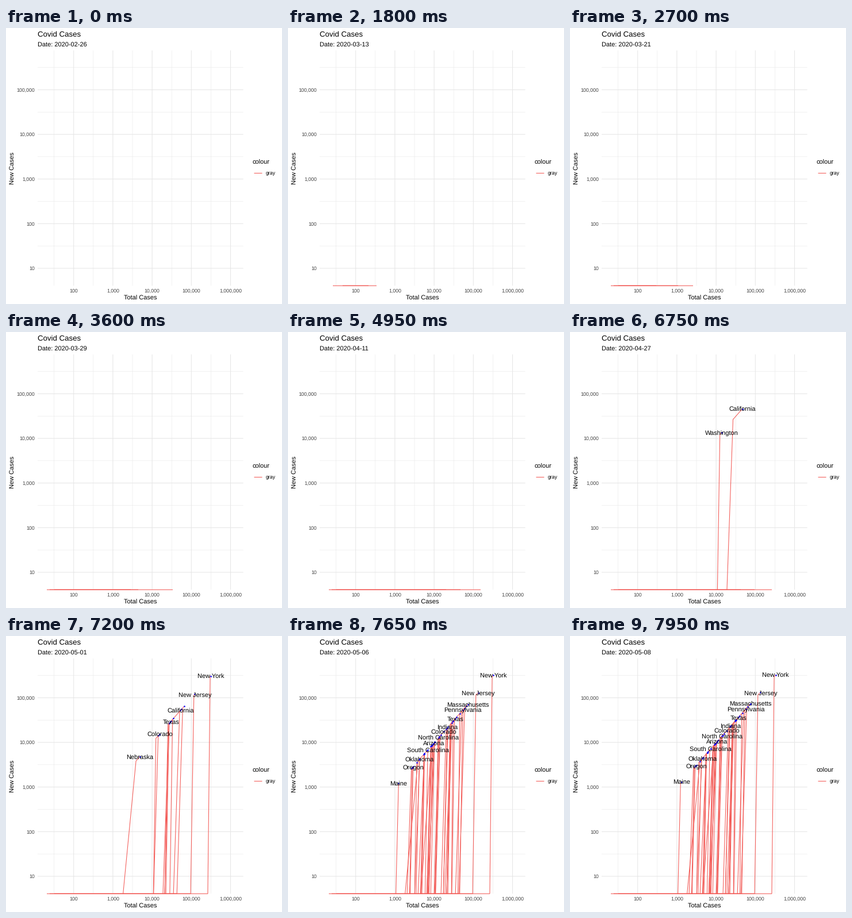
Write a matplotlib script that moves like this. It is 480 px wide and 480 px high and loops after 8 s.

```python
import numpy as np
import matplotlib.pyplot as plt
from matplotlib.animation import FuncAnimation
from matplotlib.collections import LineCollection
from matplotlib.patches import Rectangle

plt.rcParams.update({"font.family": "Liberation Sans", "text.hinting": "no_hinting"})

SIZE, DPI = 480, 72
LEFT, RIGHT, TOP, BOTTOM = 55, 412.6, 39, 448.2
TICK_MS, TICKS_PER_STEP, TICKS = 50, 3, 160
LINE_RED, GRID, TICK_TEXT = "#f35e5a", "#e6e6e6", "#444444"
ACTIVE_SHARE = 0.985
LABEL_HEIGHT = 8

# Weekly totals in thousands, all ending in the same week. The first value of
# each state still has no new cases. The order sets the label priority.
LAST_WEEK = 11
STATES = {
    "New York": (263, 302, 323.9, 340.7),
    "New Jersey": (95.9, 116.3, 131.9, 141),
    "Pennsylvania": (45.1, 54.2, 62),
    "California": (18.9, 27, 36.9, 48.9, 58.8, 73),
    "Massachusetts": (42.9, 60.3, 72, 80),
    "Texas": (21, 27.3, 34.5, 43),
    "Indiana": (17.2, 22.6, 26.5),
    "Colorado": (10.9, 14.3, 17.6, 20.3),
    "North Carolina": (10, 13, 16),
    "Arizona": (7.2, 9.7, 12.2),
    "South Carolina": (5.9, 6.9, 8),
    "Oklahoma": (3.47, 4.2, 4.85),
    "Oregon": (2.45, 2.92, 3.4),
    "Maine": (1.06, 1.24, 1.47),
    "Nebraska": (1.82, 3.88, 6.6, 8.7),
    "Washington": (10.8, 12.5, 14.1, 15.1, 16.8),
    "Illinois": (35, 50.4, 66, 84),
    "Florida": (28.3, 33.2, 37.4, 42.4),
    "Georgia": (21, 25.3, 30, 34.9),
    "Connecticut": (22.5, 26.8, 30.6, 34.9),
    "Michigan": (40.4, 45, 48.4),
    "Louisiana": (27.7, 30.4, 32.7),
    "Maryland": (20.9, 28.2, 34.8),
    "Ohio": (17.3, 21.6, 25.7),
    "Virginia": (15, 20.3, 26.7),
    "Tennessee": (10.4, 13.7, 16.4),
    "Iowa": (6.8, 10.4, 13),
    "Rhode Island": (8.2, 10.2, 11.8),
    "Minnesota": (4.6, 8.6, 13),
    "Missouri": (7.4, 9.3, 10.3),
    "Wisconsin": (6.5, 8.9, 10.9),
    "Alabama": (6.9, 8.4, 10.5),
    "Mississippi": (6.6, 8.2, 10.1),
    "Kansas": (3.9, 5.6, 7.4),
    "Delaware": (4.65, 5.5, 6.95),
    "Utah": (4.5, 5.6, 6.6),
    "Nevada": (4.9, 5.7, 6.4),
    "New Mexico": (3.2, 4.3, 5.4),
    "Arkansas": (3.2, 3.6, 4.2),
    "New Hampshire": (2.05, 2.64, 3.3),
    "South Dakota": (2.37, 2.78, 3.7),
}

# Lines along the panel floor: first week, early and late left end, and the
# right end for each week.
FLOOR_LINES = (
    (1, 78, 71, (110, 154, 214, 290, 317, 335, 345, 351)),
    (2, 95, 76, (140, 188, 230, 277, 300, 312, 321)),
    (3, 84, 84, (150, 217, 250, 275, 287, 297)),
)


def x_pos(log_total):
    return 117.7 + 68.2 * (log_total - 2)


def y_pos(log_new):
    return 417.9 - 77.62 * (log_new - 1)


fig = plt.figure(figsize=(SIZE / DPI, SIZE / DPI), dpi=DPI, facecolor="white")
ax = fig.add_axes([0, 0, 1, 1])
ax.set(xlim=(0, SIZE), ylim=(SIZE, 0))
ax.axis("off")


def write(x, y, text, size=11, color="black", **kw):
    return ax.text(x, y, text, fontsize=size, color=color, va="baseline", **kw)


def grid_line(xs, ys, width):
    ax.plot(xs, ys, color=GRID, lw=width, solid_capstyle="butt", snap=False,
            zorder=1)


for shift, width in ((-0.5, 0.53), (0, 1.07)):
    for power in range(2, 7):
        x = x_pos(power + shift)
        grid_line((x, x), (TOP, BOTTOM), width)
    for power in range(1, 6):
        y = y_pos(power - shift)
        grid_line((LEFT, RIGHT), (y, y), width)

for power in range(2, 7):
    write(x_pos(power), 460, f"{10 ** power:,}", 8.8, TICK_TEXT, ha="center")
for power in range(1, 6):
    write(50, y_pos(power) + 3.2, f"{10 ** power:,}", 8.8, TICK_TEXT, ha="right")

write(55, 15, "Covid Cases", 13.2)
subtitle = write(55, 32, "")
write(234, 473, "Total Cases", ha="center")
ax.text(14, 243.8, "New Cases", fontsize=11, rotation=90,
        rotation_mode="anchor", ha="center", va="baseline")
write(429, 237, "colour")
write(451.8, 255, "gray", 8.8)
ax.plot((430.8, 444.6), (251.5, 251.5), color=LINE_RED, lw=1.07,
        solid_capstyle="butt")

panel = Rectangle((LEFT, TOP), RIGHT - LEFT, 449 - TOP, transform=ax.transData)
floor = LineCollection([], colors=LINE_RED, linewidths=1.07, zorder=3)
trails = LineCollection([], colors=LINE_RED, linewidths=1.07, zorder=3)
for lines in (floor, trails):
    lines.set_snap(False)
    ax.add_collection(lines, autolim=False)
    lines.set_clip_path(panel)
dots, = ax.plot([], [], "o", ms=2.6, mew=0, color="blue", zorder=4, snap=False)

labels = {name: write(0, 0, name, ha="center", zorder=5) for name in STATES}
half_widths = {name: t.get_window_extent().width / 2 for name, t in labels.items()}
for label in labels.values():
    label.set_visible(False)


def floor_segments(week):
    segments = []
    for first, early_left, late_left, ends in FLOOR_LINES:
        if week >= first:
            left = early_left if week < 3 else late_left
            right = ends[min(week - first, len(ends) - 1)]
            segments.append([(left, BOTTOM), (right, BOTTOM)])
    return segments


def trail(totals, weeks):
    """Path of one state up to a moment, or None while it has no new cases."""
    age = weeks - (LAST_WEEK + 1 - len(totals))
    if age < 1:
        return None
    logs = np.log10(totals) + 3
    whole = int(age)
    head = np.interp(age, range(len(logs)), logs)
    points = [(x_pos(logs[0]), BOTTOM)]
    for value in [*logs[1:whole + 1], head]:
        points.append((x_pos(value), y_pos(value + np.log10(ACTIVE_SHARE))))
    return points


def draw(tick):
    step = tick // TICKS_PER_STEP
    days = step * 136 / 99
    date = np.datetime64("2020-02-26") + step * 136 // 99
    subtitle.set_text(f"Date: {date}")

    floor.set_segments(floor_segments(int(days // 7)))
    paths = {name: trail(totals, days / 7) for name, totals in STATES.items()}
    paths = {name: path for name, path in paths.items() if path}
    trails.set_segments(list(paths.values()))
    heads = [path[-1] for path in paths.values()]
    dots.set_data([x for x, _ in heads], [y for _, y in heads])

    # A label is skipped when it would overlap one already placed.
    placed = []
    for name, label in labels.items():
        label.set_visible(False)
        if name not in paths:
            continue
        x, y = paths[name][-1]
        half = half_widths[name]
        if any(abs(x - px) < half + ph and abs(y - py) < LABEL_HEIGHT
               for px, py, ph in placed):
            continue
        placed.append((x, y, half))
        label.set_position((x, y + 4.6))
        label.set_visible(True)
    return [subtitle, floor, trails, dots, *labels.values()]


animation = FuncAnimation(fig, draw, frames=TICKS, interval=TICK_MS,
                          repeat=True, repeat_delay=0, blit=False)
plt.show()
```
